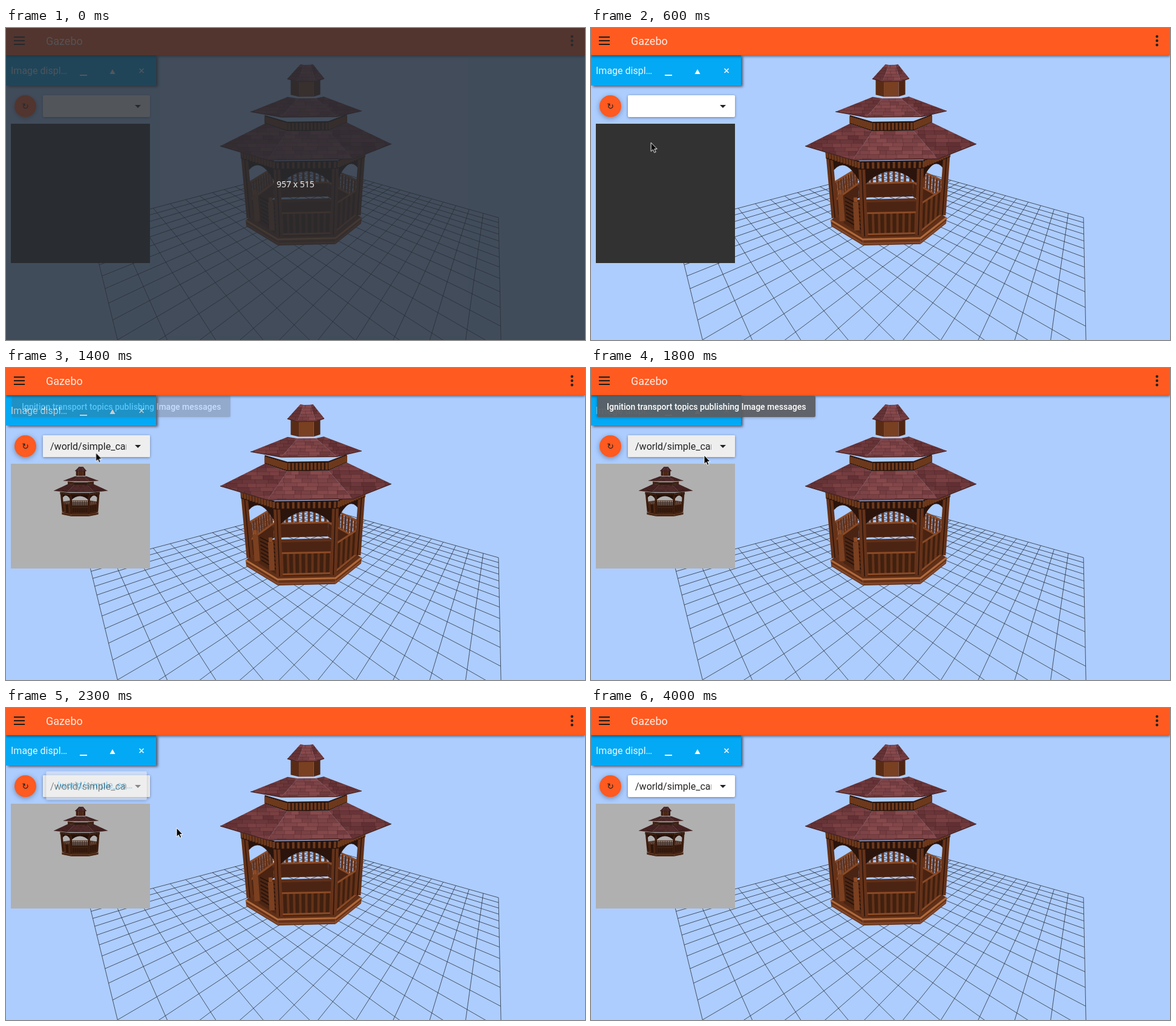
Animation of 957 by 515 pixels, one loop 4.1 s. Source, as an HTML page with a canvas:

```html
<!DOCTYPE html>
<html lang="en">
<head>
<meta charset="utf-8">
<title>Gazebo image display</title>
<style>
html, body { margin: 0; width: 100%; height: 100%; overflow: hidden; }
body { position: relative; background: #adcdff; font: 16px Roboto, sans-serif; }
body * { box-sizing: border-box; }
#stage, #stage > *, .combo > * { position: absolute; }
#stage { left: 0; top: 0; width: 957px; height: 515px; overflow: hidden; }
#stage div { white-space: nowrap; }
.head { left: 0; top: 0; width: 957px; height: 45px; background: #ff5a20; box-shadow: 0 2px 4px rgba(0,0,0,.5);
  padding-left: 66px; font-size: 18px; line-height: 44px; color: rgba(255,255,255,.88); }
.bar { left: 0; top: 45px; width: 248px; height: 50px; background: #03a9f4; box-shadow: 3px 2px 4px rgba(0,0,0,.55);
  padding-left: 8px; line-height: 51px; color: rgba(255,255,255,.9); }
.btn, .press { left: 14px; top: 111px; width: 36px; height: 36px; border-radius: 50%; }
.btn { background: #ff5a20; box-shadow: 0 2px 8px rgba(0,0,0,.35); text-align: center;
  font: 14px/36px "DejaVu Sans", sans-serif; color: #222; }
.press { background: rgba(60,60,60,.11); }
.combo { left: 61px; top: 111px; width: 177px; height: 36px; border-radius: 2px; background: #fff; box-shadow: 0 1px 4px rgba(0,0,0,.4); }
.hover { inset: 0; border-radius: 2px; background: #eee; }
.topic { left: 12px; top: 0; width: 126px; height: 36px; overflow: hidden; line-height: 37px; color: #222; }
.caret { left: 152px; top: 16px; border: solid transparent; border-width: 5px 5.5px 0; border-top-color: #222; }
.panel { left: 8px; top: 158px; width: 230px; height: 230px; background: #323232; }
#thumb { left: 8px; top: 158px; background: #b0b0b0; }
.popup { left: 61px; top: 103px; width: 177px; height: 50px; border-radius: 2px; background: #eee;
  box-shadow: 0 2px 6px rgba(0,0,0,.4); padding-left: 17px; line-height: 50px; color: #03a9f4; }
.tip { left: 10px; top: 46px; width: 361px; height: 35px; border-radius: 2px; background: rgba(92,93,96,.94);
  box-shadow: 0 1px 4px rgba(0,0,0,.25); padding-left: 16px; font-size: 14px; font-weight: 500; line-height: 36px; color: #fff; }
.veil { inset: 0; background: rgba(39,44,50,.8); color: #eee; text-align: center;
  font: 14px/515px "Noto Sans", sans-serif; }
</style>
</head>
<body>
<div id="stage">
  <canvas id="scene" width="957" height="515"></canvas>
  <div class="panel" id="panel"></div>
  <canvas id="thumb" width="230" height="173"></canvas>
  <div class="btn">↻</div>
  <div class="press" id="press"></div>
  <div class="combo">
    <div class="hover" id="hover"></div>
    <div class="topic" id="topic">/world/simple_camera</div>
    <div class="caret"></div>
  </div>
  <div class="popup" id="popup">/world/simple_ca…</div>
  <div class="bar">Image displ…</div>
  <div class="head">Gazebo</div>
  <svg width="957" height="515" style="left:0;top:0">
    <path d="M13 15h18m-18 6h18m-18 6h18" stroke="#1c1c1c" stroke-width="2"/>
    <path d="M935.500 14v0m0 7v0m0 7v0" stroke="#222" stroke-width="4.400" stroke-linecap="round"/>
    <path d="M122 78h12" stroke="#fff" stroke-width="2"/>
    <path d="M176 68l4.500 8h-9z" fill="#fff"/>
    <path d="M220.500 67l7 7m0-7l-7 7" stroke="#fff" stroke-width="1.500"/>
  </svg>
  <div class="tip" id="tip">Ignition transport topics publishing Image messages</div>
  <svg id="cursor" width="16" height="22" style="left:0;top:0;overflow:visible">
    <path d="M0 0v14.500l3.300-3l2.300 5l2.400-1.100l-2.300-4.900H10z" stroke="#fff"/>
  </svg>
  <div class="veil" id="veil">957 x 515</div>
</div>
<script>
const LOOP = 4100, TICK = 100;
const $ = id => document.getElementById(id);

let seed = 7;
const rand = () => (seed = (seed * 16807) % 2147483647) / 2147483647;
const mix = (a, b, k) => a.map((v, i) => v + (b[i] - v) * k);

function trace(c, pts) {
  c.beginPath();
  pts.forEach(p => c.lineTo(...p));
}
function fill(c, color, pts) {
  trace(c, pts);
  c.fillStyle = color;
  c.fill();
}
function line(c, color, width, ...pts) {
  trace(c, pts);
  c.strokeStyle = color;
  c.lineWidth = width;
  c.stroke();
}

// square grid seen in perspective: three corners with their depth weights
function ground(c) {
  const back = [510, 227.5, 1], right = [814, 313, .583], left = [138, 325, .447];
  const at = (u, v) => {
    const sum = f => f(back) * (1 - u - v) + f(right) * u + f(left) * v;
    const w = sum(p => p[2]);
    return [sum(p => p[0] * p[2]) / w, sum(p => p[1] * p[2]) / w];
  };
  for (let k = 0; k <= 1.01; k += .05) {
    line(c, 'rgba(40,45,55,.78)', 1, at(k, 0), at(k, 1));
    line(c, 'rgba(40,45,55,.78)', 1, at(0, k), at(1, k));
  }
}

// six-sided building made of stacked rings; corner 0 is right, 1 and 2 front, 3 left, 4 and 5 back
function pavilion(c, tilt, turn) {
  const ring = (cx, cy, rx, ry) => Array.from({ length: 6 }, (_, k) => {
    const a = k * Math.PI / 3 + turn;
    return [cx + rx * Math.cos(a), cy + ry * tilt * Math.sin(a)];
  });
  const dark = '#2a140c', wood = '#653219', lit = '#8a4a26';
  const sides = [[0, '#4f2613', '#6c383b'], [2, '#5a2c16', '#6d393c'], [1, '#7a4022', '#7e4548']];

  // point on the wall between two rings: f along the side, t up the wall
  const wall = (low, high) => (k, f, t) => {
    const n = (k + 1) % 6;
    return mix(mix(low[k], low[n], f), mix(high[k], high[n], f), t);
  };
  const quad = (at, k, t0, t1) => [at(k, 0, t0), at(k, 1, t0), at(k, 1, t1), at(k, 0, t1)];
  function slats(at, k, n, width, color, t0, t1) {
    for (let i = .5; i < n; i++) line(c, color, width, at(k, i / n, t0), at(k, i / n, t1));
  }
  function rail(at, k, n, t0, t1) {
    slats(at, k, n, 4, wood, t0, t1);
    for (const t of [t0, t1]) line(c, lit, 3, at(k, 0, t), at(k, 1, t));
  }
  function roof(low, high, row) {
    for (const [k, , color] of sides) {
      const pts = quad(wall(low, high), k, 0, 1);
      const x0 = Math.min(...pts.map(p => p[0])), x1 = Math.max(...pts.map(p => p[0]));
      const y0 = Math.min(...pts.map(p => p[1])), y1 = Math.max(...pts.map(p => p[1]));
      fill(c, color, pts);
      c.save();
      c.clip();
      for (let y = y0; y < y1; y += row) {
        for (let x = x0 - rand() * 10; x < x1;) {
          const w = row * (1.5 + rand() * 2);
          c.fillStyle = rand() < .5 ? `rgba(60,20,25,${rand() * .22})` : `rgba(185,100,100,${rand() * .18})`;
          c.fillRect(x, y, w, row);
          c.fillStyle = 'rgba(50,20,22,.28)';
          c.fillRect(x, y, .8, row);
          x += w;
        }
        c.fillRect(x0, y, x1 - x0, .8);
      }
      c.restore();
    }
    line(c, '#472526', 1.5, ...low.slice(0, 4));
  }
  function band(low, high, n) {
    const at = wall(low, high);
    for (const [k] of sides) {
      fill(c, dark, quad(at, k, 0, 1));
      slats(at, k, n, 4, '#6d391c', .1, .85);
    }
  }

  // base
  const step = ring(492, 315, 96, 38), earth = ring(492, 325, 95, 38);
  fill(c, '#5f2f18', step);
  for (const [k] of sides) fill(c, wood, quad(wall(earth, step), k, 0, 1));
  line(c, '#b0693a', 3, ...step.slice(0, 4));
  line(c, '#87492a', 2.5, ...earth.slice(0, 4).map(([x, y]) => [x, y - 3]));

  // body
  const foot = ring(492, 311, 89, 37), head = ring(491, 212, 97, 22);
  const at = wall(foot, head);
  for (const k of [3, 4, 5]) {
    fill(c, '#4a2312', quad(at, k, 0, .27));
    rail(at, k, 10, .27, .56);
  }
  fill(c, 'rgba(58,27,14,.5)', quad(at, 1, .33, .7 - .2 * tilt));
  fill(c, '#40200f', quad(at, 0, 0, .45));
  fill(c, '#40200f', quad(at, 1, 0, .33));
  fill(c, '#4d2613', [at(2, 0, 0), at(2, .7, 0), at(2, .7, .45), at(2, 0, .5)]);
  rail(at, 0, 5, .03, .45);
  rail(at, 1, 9, .03, .34);
  for (let t = .08; t < .45; t += .06) line(c, dark, 2, at(2, .1, t), at(2, .6, t));
  for (const f of [.25, .75]) {
    line(c, '#7b4020', 9, at(2, f, .02), at(2, f, .45));
    line(c, lit, 6, at(2, f, .45), at(2, f, .52));
  }
  for (const [k] of sides) {
    c.beginPath();
    c.moveTo(...at(k, 0, .72));
    c.quadraticCurveTo(...at(k, .5, 1.18), ...at(k, 1, .72));
    c.lineTo(...at(k, 1, 1));
    c.lineTo(...at(k, 0, 1));
    c.fillStyle = dark;
    c.fill();
  }
  for (const k of [0, 3, 1, 2]) {
    line(c, wood, 11, foot[k], head[k]);
    line(c, dark, 1.5, foot[k], head[k]);
  }

  // tiers, from the eaves up
  const eave = ring(495.5, 193, 141.5, 28), collar = ring(495.5, 157, 68, 15);
  band(ring(491, 214, 103, 22), ring(491, 200, 104, 22), 12);
  roof(eave, collar, 6.5);
  band(collar, ring(495.5, 143, 68, 13), 11);
  roof(ring(496, 137.5, 92, 10.5), ring(495.5, 113.5, 30, 3), 5.5);
  const drum = wall(ring(495, 110, 24.5, 4), ring(495, 83, 24.5, 4));
  for (const [k, color] of sides) fill(c, color, quad(drum, k, 0, 1));
  roof(ring(495.5, 83.5, 30.5, 5.5), ring(497, 60, 10.5, 1), 5);
}

const scene = $('scene').getContext('2d');
ground(scene);
pavilion(scene, 1, -.06);

// the same building from straight ahead, small and in shade
const thumb = $('thumb').getContext('2d');
thumb.translate(-40.5, -13);
thumb.scale(.315, .298);
pavilion(thumb, .3, 0);
thumb.globalCompositeOperation = 'source-atop';
thumb.fillStyle = 'rgba(20,8,4,.45)';
thumb.fillRect(0, 0, 957, 515);

// values move between keys in whole ticks
function play(id, prop, keys) {
  const frames = keys.map(([t, v], i) => {
    const next = i + 1 < keys.length ? keys[i + 1][0] : LOOP;
    return { offset: t / LOOP, [prop]: v, easing: `steps(${Math.max(1, (next - t) / TICK)}, end)` };
  });
  frames.push({ offset: 1, [prop]: keys.at(-1)[1] });
  $(id).animate(frames, { duration: LOOP, iterations: Infinity });
}
const jump = (t, a, b) => [[0, a], [t, a], [t, b]];
const fade = (in0, in1, out0, out1) => [[0, 0], [in0, 0], [in1, 1], [out0, 1], [out1, 0]];
const pos = (x, y) => `translate(${x}px, ${y}px)`;

play('cursor', 'transform', [
  [0, pos(430, 500)], [100, pos(430, 500)], [700, pos(33, 127)], [1100, pos(33, 127)],
  [1500, pos(187, 144)], [2100, pos(187, 144)], [2300, pos(282, 198)], [2600, pos(362, 364)],
  [2800, pos(449, 436)], [3000, pos(328, 291)], [3200, pos(318, 265)], [3500, pos(546, 400)], [3800, pos(224, 72)]
]);
play('cursor', 'opacity', [...jump(200, 0, 1), [3900, 1], [3900, 0]]);
play('veil', 'opacity', jump(100, 1, 0));
play('topic', 'opacity', jump(700, 0, 1));
play('panel', 'opacity', jump(900, 1, 0));
play('thumb', 'opacity', jump(900, 0, 1));
play('press', 'opacity', fade(600, 700, 1000, 1200));
play('hover', 'opacity', fade(1200, 1300, 2300, 2400));
play('tip', 'opacity', fade(1300, 1600, 2100, 2300));
play('popup', 'opacity', fade(1800, 2000, 2200, 2400));
play('popup', 'transform', [[0, 'scale(.88)'], [1800, 'scale(.88)'], [2000, 'scale(1)'], [2200, 'scale(1)'], [2400, 'scale(.88)']]);
</script>
</body>
</html>
```
